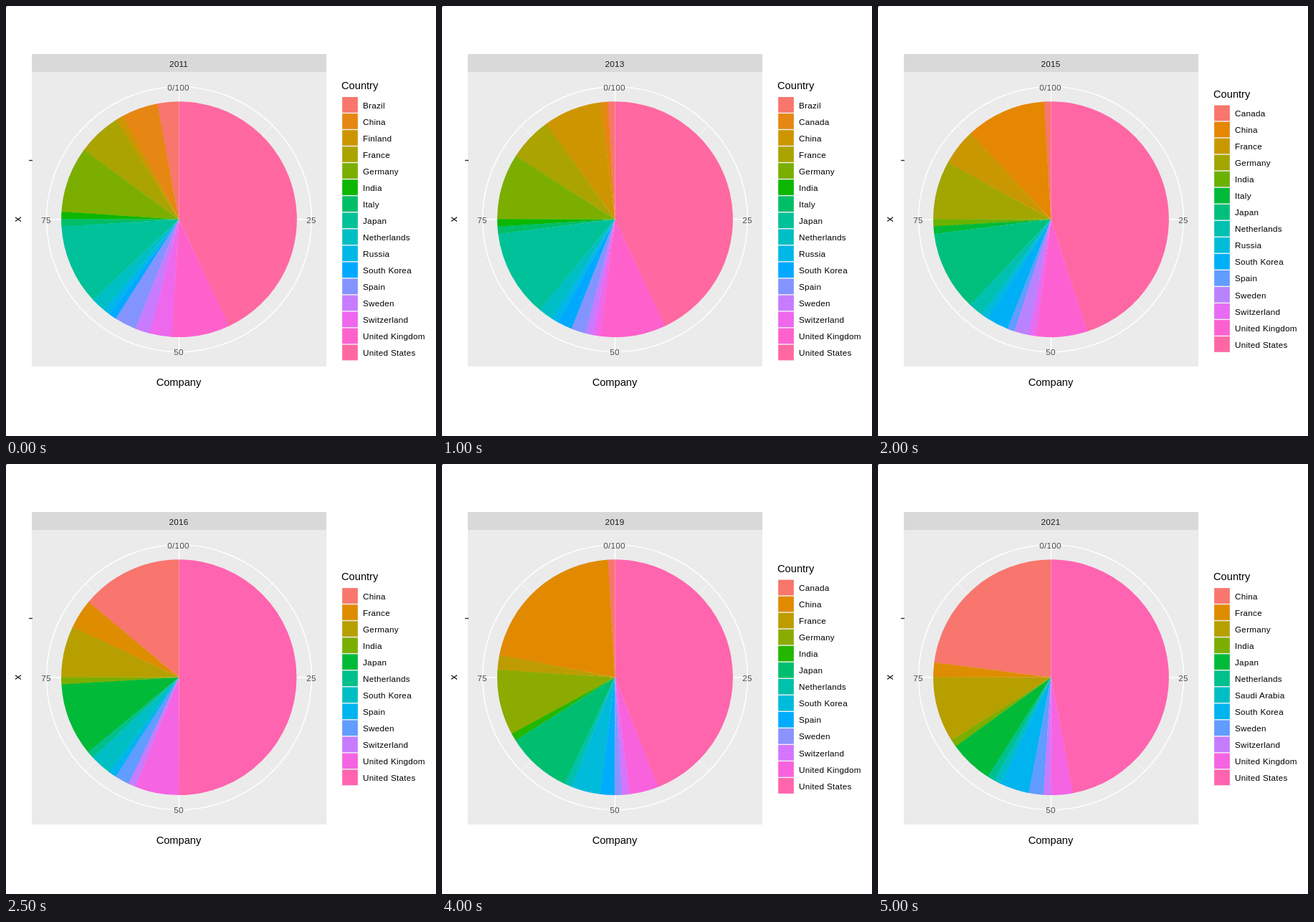
An HTML page for the animation above (5.5 s loop, 600 by 600 pixels).

```html
<!DOCTYPE html>
<html lang="en">
<head>
<meta charset="utf-8">
<title>Companies by country</title>
<style>
  html, body { margin: 0; width: 100%; height: 100%; overflow: hidden; background: #fff; }
  svg { display: block; width: 600px; height: 600px; }
  text { font: 11.73px "Liberation Sans", Arial, sans-serif; letter-spacing: .25px; }
  .title { font-size: 14.67px; letter-spacing: 0; }
  .mid { text-anchor: middle; }
  .tick { fill: #4d4d4d; }
</style>
</head>
<body>
<svg viewBox="0 0 600 600">
  <rect width="1" height="1"/>
  <rect x="36" y="67" width="411" height="25" fill="#d9d9d9"/>
  <rect x="36" y="92" width="411" height="411" fill="#ebebeb"/>
  <path d="M32 215.5H37" stroke="#333" stroke-width="1.42"/>
  <g id="grid" fill="none" stroke="#fff"></g>
  <g id="pie"></g>
  <text class="mid tick" x="240.5" y="118">0/100</text>
  <text class="mid tick" x="426" y="303">25</text>
  <text class="mid tick" x="241" y="487">50</text>
  <text class="mid tick" x="56" y="303">75</text>
  <text class="mid" id="year" x="241" y="85" fill="#1a1a1a"></text>
  <text class="mid title" x="241" y="530">Company</text>
  <text class="mid title" transform="translate(21 297.5) rotate(-90)">x</text>
  <g id="legend"></g>
</svg>
<script>
const STEP = 500, FIRST_YEAR = 2011;
const CX = 241.5, CY = 297.7, PIE_R = 164.4, GRID_R = 184.95, KEY = 23.04;

const NAMES = {
  BR: 'Brazil', CA: 'Canada', CN: 'China', FI: 'Finland', FR: 'France', DE: 'Germany',
  IN: 'India', IT: 'Italy', JP: 'Japan', NL: 'Netherlands', RU: 'Russia', SA: 'Saudi Arabia',
  KR: 'South Korea', ES: 'Spain', SE: 'Sweden', CH: 'Switzerland', UK: 'United Kingdom',
  US: 'United States'
};

// Percentage per country, one row per year
const YEARS = [
  'BR3 CN5 FI1 FR6 DE9 IN1 IT1 JP11 NL2 RU1 KR1 ES3 SE2 CH3 UK8 US43',
  'BR2 CN6 FR5 DE9 IN1 IT1 JP12 NL2 RU1 KR2 ES2 SE1 UK11 US45',
  'BR1 CA1 CN8 FR6 DE9 IN1 IT1 JP12 NL2 RU1 KR2 ES2 SE1 CH1 UK9 US43',
  'CA1 CN10 FR6 DE10 IN1 IT1 JP12 NL3 KR3 ES2 SE2 CH1 UK8 US40',
  'CA1 CN11 FR5 DE8 IN1 IT1 JP11 NL2 RU1 KR3 ES1 SE2 CH1 UK7 US45',
  'CN14 FR4 DE7 IN1 JP10 NL1 KR3 ES1 SE2 CH1 UK6 US50',
  'CN17 FR3 DE8 JP9 NL1 KR3 ES1 SE2 CH1 UK5 US50',
  'CN20 FR2 DE9 JP7 NL1 KR3 ES2 SE2 CH1 UK4 US49',
  'CA1 CN21 FR2 DE9 IN1 JP9 NL1 KR4 ES2 SE1 CH1 UK4 US44',
  'CA1 CN21 FR2 DE9 IN1 JP8 NL1 SA1 KR4 ES1 SE1 CH1 UK4 US45',
  'CN23 FR2 DE9 IN1 JP6 NL1 SA1 KR4 SE2 CH1 UK3 US47'
].map(row => row.split(' ').map(s => ({ name: NAMES[s.slice(0, 2)], share: +s.slice(2) })));

const $ = id => document.getElementById(id);

// Point on a circle, share counted clockwise from the top
function point(share, r) {
  const a = share / 50 * Math.PI;
  return `${CX + r * Math.sin(a)} ${CY - r * Math.cos(a)}`;
}

// Evenly spaced hue in polar LUV at lightness 65, chroma 100
function hue(i, n) {
  const h = (15 + 360 * i / n) * Math.PI / 180, L = 65, C = 100;
  const Y = ((L + 16) / 116) ** 3;
  const u = C * Math.cos(h) / (13 * L) + 0.1978398;
  const v = C * Math.sin(h) / (13 * L) + 0.4683363;
  const X = 9 * Y * u / (4 * v), Z = -X / 3 - 5 * Y + 3 * Y / v;
  const rgb = [
    3.240479 * X - 1.53715 * Y - 0.498535 * Z,
    -0.969256 * X + 1.875992 * Y + 0.041556 * Z,
    0.055648 * X - 0.204043 * Y + 1.057311 * Z
  ].map(c => {
    const s = c > 0.00304 ? 1.055 * c ** (1 / 2.4) - 0.055 : 12.92 * c;
    return Math.round(255 * Math.min(1, Math.max(0, s)));
  });
  return `rgb(${rgb})`;
}

function drawGrid() {
  let s = `<circle cx="${CX}" cy="${CY}" r="${GRID_R}" stroke-width="1.42"/>`;
  for (let i = 0; i < 8; i++)
    s += `<path d="M${CX} ${CY}L${point(i * 12.5, GRID_R)}" stroke-width="${i % 2 ? 0.71 : 1.42}"/>`;
  $('grid').innerHTML = s;
}

function drawYear(index) {
  const rows = YEARS[index], n = rows.length;
  const top = 310.7 - n * KEY / 2;
  let end = 100, pie = '';
  let legend = `<text class="title" x="468" y="${Math.round(top - 10.4)}">Country</text>
    <rect x="468.5" y="${top}" width="${KEY}" height="${n * KEY}" fill="#f2f2f2"/>`;
  rows.forEach(({ name, share }, i) => {
    const fill = hue(i, n), start = end - share, y = top + i * KEY;
    // A slight overlap hides the seam to the next slice
    pie += `<path fill="${fill}" d="M${CX} ${CY}L${point(start, PIE_R)}
      A${PIE_R} ${PIE_R} 0 0 1 ${point(Math.min(100, end + 0.04), PIE_R)}Z"/>`;
    legend += `<rect x="469.2" y="${y + 0.7}" width="${KEY - 1.4}" height="${KEY - 1.4}" fill="${fill}"/>
      <text x="498" y="${Math.round(y + KEY / 2 + 4.68)}">${name}</text>`;
    end = start;
  });
  $('pie').innerHTML = pie;
  $('legend').innerHTML = legend;
  $('year').textContent = FIRST_YEAR + index;
}

let shown = -1;
function tick() {
  const index = Math.floor(performance.now() / STEP) % YEARS.length;
  if (index !== shown) drawYear(shown = index);
  requestAnimationFrame(tick);
}

drawGrid();
tick();
</script>
</body>
</html>
```
